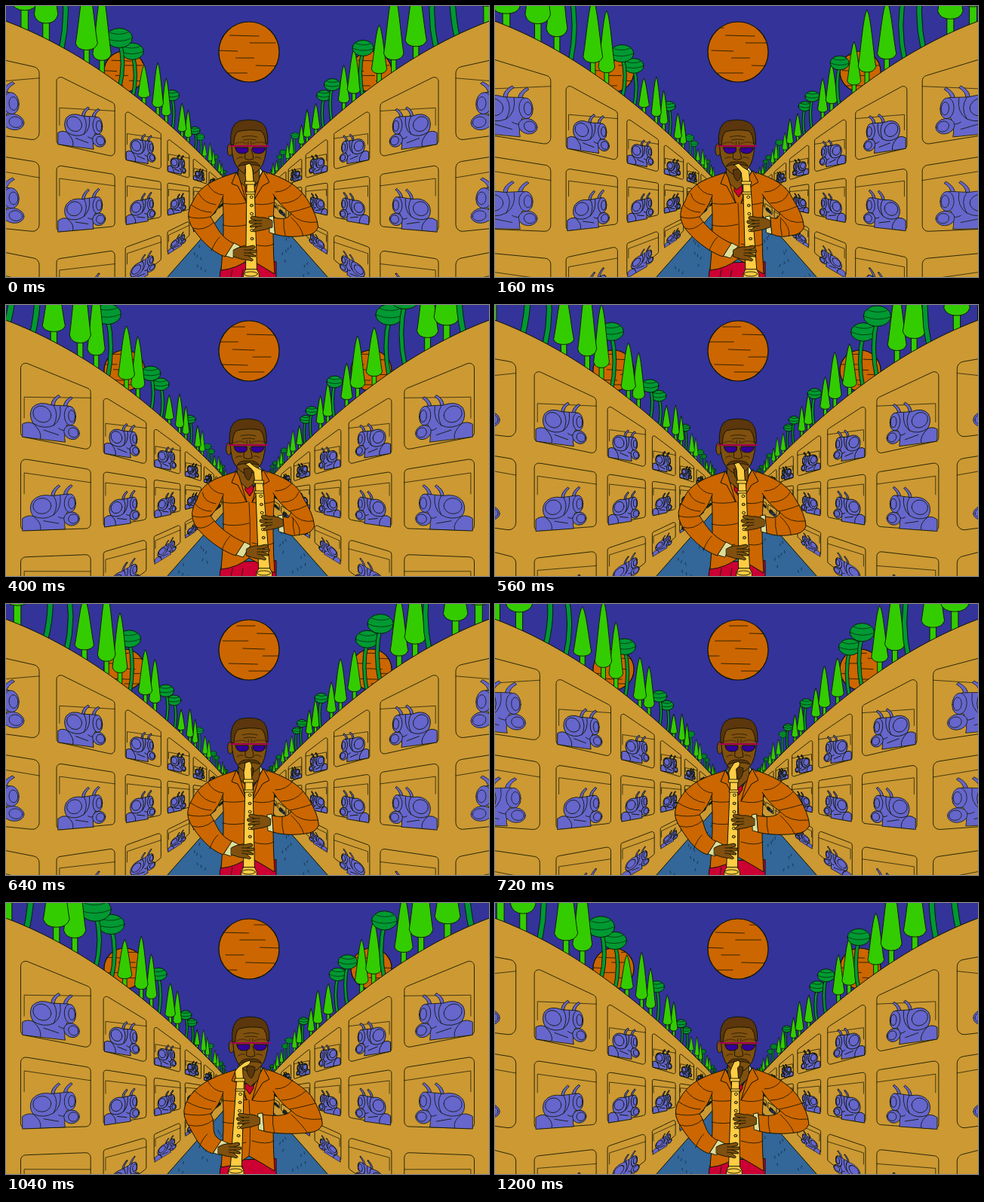
These frames come from a looping animation (640x360 px, 1.28 s). An HTML page with a canvas:

```html
<!DOCTYPE html>
<html lang="en">
<head>
<meta charset="utf-8">
<title>Musician between the walls</title>
<style>
html, body { margin: 0; width: 100%; height: 100%; overflow: hidden; background: #333399; }
canvas { display: block; width: 640px; height: 360px; }
</style>
</head>
<body>
<canvas id="stage" width="640" height="360"></canvas>
<script>
const ctx = document.getElementById('stage').getContext('2d');
const LOOP = 1280, STEP = 80;
const INK = '#0c1400', TAN = '#cc9933', ORANGE = '#cc6600', PINE = '#33cc00', LEAF = '#009933',
  METAL = '#6666cc', SKIN = '#80500f', HAIR = '#5c360c', BRASS = '#ffcc44', CREAM = '#dddd99', RED = '#cc0033';

function shape(d, fill, width = 1, ink = INK) {
  const p = d instanceof Path2D ? d : new Path2D(d);
  if (fill) { ctx.fillStyle = fill; ctx.fill(p); }
  if (width) { ctx.lineWidth = width; ctx.strokeStyle = ink; ctx.stroke(p); }
}
function oval(x, y, rx, ry, fill, width = 1) {
  const p = new Path2D();
  p.ellipse(x, y, rx, ry, 0, 0, Math.PI * 2);
  shape(p, fill, width);
}
function mirrored(draw) {
  draw(0);
  ctx.save();
  ctx.translate(640, 0);
  ctx.scale(-1, 1);
  draw(1);
  ctx.restore();
}

// Wall: depth s shrinks the distance d from x = 302; each edge is a curve y(d).
const dist = s => 235 * Math.exp(-0.491 * s);
const curve = (a, c, y0 = 249) => d => y0 + a * d + c * d * d;
const rim = curve(-1.1, 0.0012, 243);
// Rows: top edge, bottom edge, height of the inner line at either end.
const ROWS = [
  [curve(-0.93, 0.0011), curve(-0.365, 0.00036), 0.48, 0.14],
  [curve(-0.16, 0), curve(0.4, -0.00078), 0.2, 0.22],
  [curve(0.7, -0.0014), curve(1, -0.0009), 0.15, 0.3]
];

const BODY = new Path2D('M2 0V-17Q8 -22 15 -20Q9 -30 14 -41Q22 -52 38 -48L58 -50Q68 -44 66 -30L56 -24Q52 -10 54 -1Z');
const HORN = new Path2D('M37 -48Q37 -56 46 -63L48 -61Q41 -55 41 -48Z');
const FOLDS = new Path2D('M15 -20Q28 -13 40 -21Q50 -30 48 -48M40 -48Q47 -36 40 -21M16 -19Q26 -10 24 -1M28 -13L46 -9M46 -18Q52 -14 55 -18');

function mask(scale) {
  const w = 0.85 / scale;
  shape(HORN, METAL, w);
  ctx.save();
  ctx.translate(15, 0);
  shape(HORN, METAL, w);
  ctx.restore();
  shape(BODY, METAL, w);
  oval(26, -34, 11, 11, null, w);
  shape(FOLDS, null, w);
  oval(60, -37, 7, 13, METAL, w);
  oval(62, -37, 4, 8, METAL, w);
  oval(62, -15, 9.5, 9.5, METAL, w);
  oval(64, -15, 6, 6.5, METAL, w);
}

function cell(s, [top, bottom, backL, backR]) {
  const d0 = dist(s), d1 = dist(s + 0.81), x0 = 302 - d0, x1 = 302 - d1, w = d0 - d1;
  if (x1 < -4) return;
  const a = top(d0), b = top(d1), c = bottom(d1), e = bottom(d0), r = w * 0.07;
  const p = new Path2D();
  p.moveTo((x0 + x1) / 2, (a + b) / 2);
  p.arcTo(x1, b, x1, c, r);
  p.arcTo(x1, c, x0, e, r);
  p.arcTo(x0, e, x0, a, r);
  p.arcTo(x0, a, x1, b, r);
  p.closePath();
  shape(p, TAN, 0.85);
  if (w > 14) {
    const y = a + (e - a) * backL;
    shape(`M${x0 + w * 0.05} ${y + w * 0.3}V${y}L${x1} ${b + (c - b) * backR}`, null, 0.7);
  }
  ctx.save();
  ctx.transform(w / 85, (c - e) / 120, 0, (e - a + c - b) / 184, x0, e);
  mask(w / 85);
  ctx.restore();
}

function wall(shift) {
  const p = new Path2D();
  p.moveTo(-5, rim(307));
  for (let d = 302; d > 6; d -= 8) p.lineTo(302 - d, rim(d));
  p.lineTo(294, 269);
  p.lineTo(213, 361);
  p.lineTo(-5, 361);
  p.closePath();
  shape(p, TAN, 1);
  for (let n = 5; n >= -3; n--) for (const row of ROWS) cell(n + shift, row);
}

// Trees: [depth, height, width, round?], repeating every two depth units.
const TREES = [
  [[0.46, 0.52, 0.2, 1], [0.78, 0.53, 0.14], [1, 0.57, 0.13], [1.28, 0.45, 0.21, 1],
    [1.52, 0.46, 0.2, 1], [1.75, 0.38, 0.12], [2.07, 0.6, 0.13], [2.29, 0.56, 0.12]],
  [[0.2, 0.5, 0.2, 1], [0.43, 0.5, 0.2, 1], [0.68, 0.46, 0.13], [0.99, 0.57, 0.14],
    [1.22, 0.44, 0.12], [1.51, 0.48, 0.19, 1], [1.69, 0.5, 0.13], [1.91, 0.47, 0.12]]
];

function tree(q, tall, wide, round) {
  const size = 300 * Math.exp(-0.468 * q), x = 315 - size;
  if (x < -50 || x > 292) return;
  const y = rim(302 - x), h = tall * size, r = wide * size / 2, top = y - h;
  const lw = size > 60 ? 0.9 : 0.6, t = size * 0.012 + 0.4;
  if (round) {
    shape(`M${x - t} ${y + 6}Q${x + r * 0.5 - t} ${y - h * 0.4} ${x - t} ${top + r}H${x + t}Q${x + r * 0.5 + t} ${y - h * 0.4} ${x + t} ${y + 6}Z`, LEAF, lw);
    oval(x, top + r * 0.75, r, r * 0.75, LEAF, lw);
    shape(`M${x - r} ${top + r * 0.8}Q${x} ${top + r * 1.2} ${x + r} ${top + r * 0.75}M${x - r * 0.7} ${top + r * 0.35}Q${x} ${top + r * 0.6} ${x + r * 0.7} ${top + r * 0.3}`, null, lw * 0.7);
    return;
  }
  const low = y - h * 0.14;
  shape(`M${x - t * 1.2} ${y + 6}V${low - 4}H${x + t * 1.2}V${y + 6}Z`, PINE, lw);
  shape(`M${x} ${top}C${x + r * 0.4} ${top + 3} ${x + r * 0.7} ${low - h * 0.3} ${x + r} ${low - h * 0.08}Q${x + r * 0.8} ${low} ${x} ${low}Q${x - r * 0.8} ${low} ${x - r} ${low - h * 0.08}C${x - r * 0.7} ${low - h * 0.3} ${x - r * 0.4} ${top + 3} ${x} ${top}Z`, PINE, lw);
}

function forest(side, move) {
  for (let lap = 2; lap >= -2; lap--) {
    for (const [q, ...look] of TREES[side].slice().reverse()) tree(q + move + lap * 2, ...look);
  }
}

function planet(x, y, r, turn) {
  oval(x, y, r, r, ORANGE, 1.2);
  ctx.save();
  ctx.beginPath();
  ctx.arc(x, y, r, 0, Math.PI * 2);
  ctx.clip();
  for (let i = 0; i < 7; i++) {
    const ly = y - r * 0.8 + i * r * 0.25;
    const lx = x - r * 1.3 + ((i * 0.37 + turn) % 1) * r * 1.8;
    shape(`M${lx} ${ly}l${r * (0.6 + (i * 3 % 4) * 0.12)} ${i % 2}`, null, 0.8);
  }
  ctx.restore();
}

function road(turn) {
  shape('M211 362L290 262H350L429 362Z', '#336699', 1);
  for (let i = 0; i < 26; i++) {
    const z = (i * 0.381 - turn + 2) % 1, y = 292 + z * 68;
    const half = (y - 241) * 0.89, x = 320 + (i % 2 ? 1 : -1) * half * (0.55 + (i * 0.29 % 0.4));
    shape(`M${x} ${y}l${i % 3 - 1} 3`, null, 0.8, '#0f2a3c');
  }
}

function head() {
  shape('M308 208L308 232L322 244L336 232L336 208Z', SKIN, 0.9);
  oval(297, 191, 3.5, 8, SKIN, 0.9);
  shape('M299 172Q298 198 304 210Q312 223 322 225Q333 223 340 211Q346 198 346 172Q340 156 322 156Q302 157 299 172Z', SKIN);
  shape('M298 184Q296 158 309 153Q324 149 337 154Q348 159 347 183L344 183Q344 171 338 166Q322 163 307 167Q302 172 302 184Z', HAIR, 0.9);
  shape('M313 174Q322 171 333 174M315 178Q322 176 331 178M321 180V184M325 180V184M306 203Q309 200 314 201M338 203Q335 200 330 201', null, 0.7);
  shape('M304 183Q312 179 319 183M327 183Q335 179 343 182', null, 1.4, HAIR);
  shape('M319 190Q316 199 317 203Q322 206 328 203Q328 198 325 190', SKIN, 0.9);
  shape('M304 188H321V193Q319 196 312 196Q305 196 304 188ZM327 188H344Q343 196 335 196Q328 196 327 192Z', '#330099', 0.9);
  shape('M297 186H348', null, 2, '#aa0055');
  shape('M308 213Q311 206 322 207Q334 206 337 213Q330 210 322 211Q315 210 308 213Z', HAIR, 0.8);
  shape('M317 218Q322 215 328 218Q328 229 323 233Q317 229 317 218Z', HAIR, 0.8);
}

function hand(x, y, flip) {
  ctx.save();
  ctx.translate(x, y);
  ctx.scale(flip, 1);
  shape('M-18 -4Q-10 -9 -2 -8L8 -10Q12 -9 10 -6L3 -4L12 -4Q14 -1 11 0L3 0L11 3Q12 6 9 5L2 4L8 9Q7 12 3 10Q-8 9 -18 5Z', SKIN, 0.9);
  shape('M3 -4L-4 -4M3 0L-4 0M2 4L-4 3', null, 0.8);
  ctx.restore();
}

function sax(nx, bx) {
  const at = k => nx + (bx - nx) * k;
  shape(`M${nx - 4} 236L${bx - 7} 352H${bx + 8}L${nx + 6} 236Z`, BRASS);
  shape(`M317 211L323 209Q327 214 ${nx + 4} 219L${nx + 5} 234H${nx - 5}L${nx - 6} 224Q${nx - 5} 220 317 211Z`, BRASS);
  shape(`M${nx - 6} 233h13v4h-13ZM${nx - 5} 247h12v3h-12Z`, BRASS, 0.9);
  shape(`M${bx - 7} 350Q${bx - 11} 355 ${bx - 10} 362H${bx + 11}Q${bx + 12} 355 ${bx + 8} 350Z`, BRASS);
  oval(bx, 356, 9, 3, BRASS, 0.9);
  for (let i = 0; i < 8; i++) {
    const k = (i + 1.8) / 10.5;
    oval(at(k) + 2, 234 + k * 116, 2, 1.7, i % 2 ? '#cc9933' : BRASS, 0.9);
  }
}

function man(s) {
  const cl = 297 + 17 * s, el = 241 + 6 * s, cr = 357 + 15 * s, er = 412 - 6 * s;
  const nx = 322 + 14 * s, bx = 323 + 21 * s;
  shape('M287 342Q283 352 283 362H358V340Z', RED);
  shape('M314 350L312 361M300 350L298 361', null, 0.8);
  shape('M304 221Q290 228 287 250Q290 300 285 351Q306 349 322 336Q340 346 356 356Q352 300 356 250Q357 230 342 219L324 250Z', ORANGE);
  shape('M307 222L322 250L340 220L336 214H309Z', CREAM);
  shape('M319 229L326 229L328 246L323 254L317 246Z', RED);
  ctx.save();
  ctx.translate(-2 * s, 0);
  head();
  ctx.restore();
  shape('M305 221L299 236L307 239L319 262L309 228ZM341 219L349 234L340 239L326 262L336 228Z', ORANGE);
  shape('M322 262Q325 310 322 336M287 262Q304 265 320 261M287 291Q302 295 322 290M326 262Q342 266 355 261M326 316Q346 322 355 316M288 318Q304 322 318 318', null, 0.8);

  shape(`M303 222C280 229 258 237 ${el + 7} 258Q${el - 5} 276 ${el + 4} 292C${el + 14} 308 ${cl - 26} 327 ${cl - 8} 333L${cl + 5} 316C${cl - 14} 308 280 294 271 280Q282 270 288 252`, ORANGE);
  shape(`M267 236Q274 250 288 251M${el + 14} 249Q262 262 278 264M${el + 4} 264Q258 274 272 274M${el} 280Q256 284 271 280M${el + 6} 295Q262 300 276 287M${cl - 26} 325Q${cl - 21} 312 ${cl - 15} 307`, null, 0.8);
  shape(`M346 221C368 229 386 237 ${er - 13} 256Q${er + 1} 278 ${er + 2} 294Q${er - 2} 304 ${er - 16} 305C${er - 28} 307 ${cr + 10} 307 ${cr - 2} 303L${cr - 4} 281C${cr + 8} 283 372 284 378 276Q364 266 354 250`, ORANGE);
  shape(`M380 235Q372 247 357 247M${er - 19} 249Q384 262 365 262M${er - 7} 266Q388 272 376 274M${er + 1} 287Q390 290 378 276M${er - 18} 305Q392 294 378 281M${cr + 12} 305Q${cr + 9} 294 ${cr + 10} 283`, null, 0.8);

  sax(nx, bx);
  shape(`M${cl - 7} 332L${cl + 2} 335L${cl + 12} 319L${cl + 4} 315Z`, CREAM, 0.9);
  shape(`M${cr - 2} 303L${cr - 9} 301L${cr - 10} 280L${cr - 4} 279Z`, CREAM, 0.9);
  hand(bx - 5, 328, 1);
  hand(nx + (bx - nx) * 0.45 + 11, 289, -1);
}

function draw(ms) {
  const t = Math.floor((ms % LOOP) / STEP) * STEP;
  const move = t / 640, turn = t / LOOP;
  ctx.fillStyle = '#333399';
  ctx.fillRect(0, 0, 640, 360);
  planet(322, 61, 40, turn);
  planet(157, 87, 27, turn);
  planet(484, 87, 27, turn);
  mirrored(side => forest(side, move));
  road(turn * 2);
  mirrored(() => wall(move % 1));
  man(Math.sin((t + 15) / LOOP * Math.PI * 2));
}

ctx.lineJoin = ctx.lineCap = 'round';
function tick() {
  draw(performance.now());
  requestAnimationFrame(tick);
}
tick();
</script>
</body>
</html>
```
